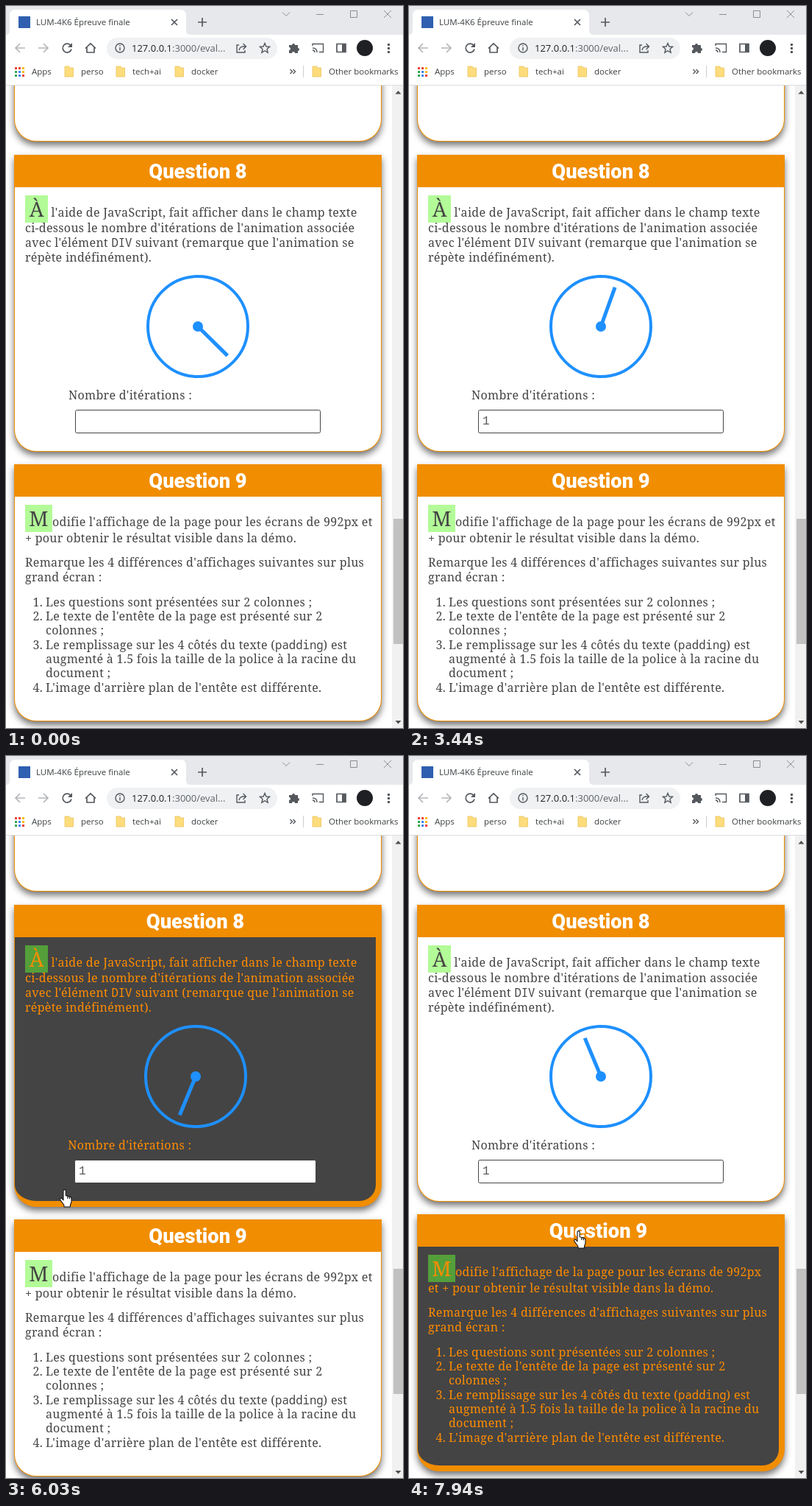
Animation, 540 px wide and 980 px high, one loop 8 s. Source, as an HTML page:

```html
<!DOCTYPE html>
<html lang="fr">
<head>
<meta charset="utf-8">
<title>Épreuve finale</title>
<style>
  html, body { margin: 0; width: 100%; height: 100%; overflow: hidden; background: #fff; }
  svg { display: block; }
  .shell { fill: #f18d00; filter: drop-shadow(0 5px 5px rgba(0, 0, 0, .55)); }
  .title { font: 900 27.3px Roboto, sans-serif; fill: #fff; text-anchor: middle; }
  .body { font: 16px "Noto Serif", serif; letter-spacing: .3px; }
  .letter { font-size: 28px; letter-spacing: 0; text-anchor: middle; }
  .mono { font: 15.6px "Noto Sans Mono", monospace; letter-spacing: 0; }
  .number { text-anchor: end; }
  .field { font: 16px "Liberation Mono", monospace; fill: #555; }
  .dial { stroke: #1e90ff; fill: none; }
  .ui { font: 11.5px "Open Sans", sans-serif; fill: #3c4043; }
  .icon { fill: none; stroke: #55595e; stroke-width: 1.7; }
  .fine { stroke-width: 1.4; }
  .faint { stroke: #b4b6b9; }
  .thin { stroke: #8b8d90; stroke-width: 1; }
  .solid { fill: #55595e; stroke: none; }
</style>
</head>
<body>
<svg width="540" height="980" viewBox="0 0 540 980">
  <g id="page"></g>

  <g id="scrollbar">
    <rect x="525" y="107" width="15" height="873" fill="#f1f1f1"/>
    <rect x="527" y="696" width="13" height="170" fill="#c1c1c1"/>
    <path d="M529.5 119.5h8l-4-4.5zM529.5 970h8l-4 4.5z" fill="#505050"/>
  </g>

  <g id="browser" class="ui">
    <rect width="540" height="40" fill="#e7e8eb"/>
    <rect y="39" width="540" height="69" fill="#fff"/>
    <rect y="107" width="540" height="1" fill="#dcdde0"/>
    <path d="M0 39q5 0 5-6V13q0-8 8-8H237q8 0 8 8V33q0 6 6 6z" fill="#fff"/>
    <rect x="17" y="14" width="16" height="16" fill="#2f5fb0"/>
    <text x="41" y="26">LUM-4K6 Épreuve finale</text>
    <path class="icon" d="M225 18l8 8m0-8l-8 8M261 22h12m-6-6v12"/>
    <path class="icon thin" d="M376 8.5l5 5 5-5M422 11.5h10M468.5 6.5h9v9h-9zM514 6l10 10m0-10l-10 10"/>

    <path class="icon faint" d="M26 57H13m6-6l-6 6 6 6M44 57h13m-6-6l6 6-6 6"/>
    <path class="icon" d="M88 53.5a6 6 0 1 0 1 5M108 57.5l7-6.500 7 6.500M110 56v7h10v-7"/>
    <path class="solid" d="M90 50v6h-6z"/>
    <rect x="137" y="43" width="232" height="29" rx="14.5" fill="#eff1f3"/>
    <circle class="icon fine" cx="155" cy="57" r="6"/>
    <path class="icon fine" d="M155 56v4.5M155 53v1.5M317 53h-3v10h11v-3M317 60q1-5 6-5h3m-3.5-4l4 4-4 4"/>
    <text x="171" y="62" font-size="13" fill="#202124">127.0.0.1<tspan fill="#5f6368">:3000/eval...</tspan></text>
    <path class="icon fine" d="M352 50.5l1.9 4.5 4.7.4-3.6 3.1 1.1 4.7-4.1-2.5-4.1 2.5 1.1-4.7-3.6-3.1 4.7-.4z"/>
    <path class="solid" d="M385 53h4a2 2 0 1 1 4 0h4v4a2 2 0 1 1 0 4v3h-4a2 2 0 1 0-4 0h-4v-4a2 2 0 1 0 0-4z"/>
    <path class="icon fine" d="M417 54v-2.5h14.5v11H426M417 57q6 0 6 6M417 60q3 0 3 3"/>
    <path class="icon" d="M450 51.5h12v11h-12z"/>
    <path class="solid" d="M457 51h5v12h-5z"/>
    <circle cx="488" cy="57" r="11" fill="#1f2023"/>
    <path class="solid" d="M519 51h3v3h-3zM519 56h3v3h-3zM519 61h3v3h-3z"/>

    <g id="apps"></g>
    <text x="35" y="93">Apps</text>
    <text x="102" y="93">perso</text>
    <text x="172" y="93">tech+ai</text>
    <text x="252" y="93">docker</text>
    <text x="439" y="93">Other bookmarks</text>
    <path class="icon fine" d="M386.5 86l3 3-3 3m4-6l3 3-3 3"/>
    <rect x="404" y="81" width="1" height="16" fill="#cdcfd2"/>
  </g>

  <g id="cursor">
    <path fill="#fff" stroke="#111" stroke-width="1.1" stroke-linejoin="round"
      d="M5 2.2a1.6 1.6 0 0 1 3.2 0V8.8l5.4 1.2a3 3 0 0 1 2.4 3v3.6c0 2.2-1.6 3.6-1.6 6V24H6v-1.8C6 20.5 2.8 18 .8 14.2 0 12.6 2 11.4 3.2 12.8L5 14.8ZM10.8 9.5v3.5M13.4 10v3.2"/>
  </g>
</svg>

<script>
const LOOP = 8000, STEP = 67.9;
const RADIUS = 30, LEFT = 11, RIGHT = 511;
const $ = selector => document.querySelector(selector);
const set = (element, attributes) => {
  for (const name in attributes) element.setAttribute(name, attributes[name]);
};

const line = (x, y, text, attributes = '') => `<text x="${x}" y="${y}" ${attributes}>${text}</text>`;
const item = (y, number, text) => line(50, y, number + '.', 'class="number"') + line(54, y, text);

// Card contents use coordinates relative to the top of their card.
const card = (id, title, letter, capWidth, content) => `
  <g id="${id}">
    <path class="shell"/><path class="inner"/>
    <text class="title" y="32">${title}</text>
    <g class="body">
      <rect class="cap" x="26" y="55" width="${capWidth}" height="37"/>
      ${line(26 + capWidth / 2, 83.5, letter, 'class="letter"')}
      ${content}
    </g>
  </g>`;

$('#page').innerHTML =
  card('previous', '', '', 0, '') +
  card('q8', 'Question 8', 'À', 31,
    line(61.5, 83.5, "l'aide de JavaScript, fait afficher dans le champ texte") +
    line(26, 105, "ci-dessous le nombre d'itérations de l'animation associée") +
    line(26, 124.5, `avec l'élément <tspan class="mono">DIV</tspan> suivant (remarque que l'animation se`) +
    line(26, 145, 'répète indéfinément).') +
    `<g id="dial" class="dial">
      <circle r="68" stroke-width="4"/>
      <circle r="7" fill="#1e90ff" stroke="none"/>
      <path id="hand" d="M0 0V-56.5" stroke-width="5"/>
    </g>` +
    line(85, 332, "Nombre d'itérations :", 'id="label"') +
    '<rect id="input" y="346.5" height="31" rx="2" fill="#fff" stroke="#444"/>' +
    line(100, 366, '', 'id="count" class="field"')) +
  card('q9', 'Question 9', 'M', 37,
    line(63, 83.5, '', 'id="wrapA"') +
    line(26, 106, '', 'id="wrapB"') +
    line(26, 139, "Remarque les 4 différences d'affichages suivantes sur plus") +
    line(26, 158.5, 'grand écran :') +
    item(192.5, 1, 'Les questions sont présentées sur 2 colonnes ;') +
    item(211.5, 2, "Le texte de l'entête de la page est présenté sur 2") +
    line(54, 231, 'colonnes ;') +
    item(250.5, 3, 'Le remplissage sur les 4 côtés du texte (<tspan class="mono">padding</tspan>) est') +
    line(54, 270, 'augmenté à 1.5 fois la taille de la police à la racine du') +
    line(54, 289, 'document ;') +
    item(308.5, 4, "L'image d'arrière plan de l'entête est différente."));

const appColors = ['#ea4335', '#ea4335', '#fbbc04', '#34a853', '#4285f4', '#fbbc04', '#34a853', '#4285f4', '#ea4335'];
$('#apps').innerHTML =
  appColors.map((color, i) =>
    `<rect x="${12 + i % 3 * 5}" y="${83 + Math.floor(i / 3) * 5}" width="3" height="3" fill="${color}"/>`).join('') +
  [80, 150, 230, 417].map(x =>
    `<path d="M${x} 82h6l1 2h4.500v12H${x}z" fill="#fddc7c" stroke="#e9c35c" stroke-width=".8"/>`).join('');

// CSS "ease" timing curve, solved by bisection.
function ease(x) {
  if (x <= 0) return 0;
  if (x >= 1) return 1;
  let low = 0, high = 1, s;
  for (let i = 0; i < 20; i++) {
    s = (low + high) / 2;
    if (.75 * s * (1 - s) + s ** 3 < x) low = s; else high = s;
  }
  return .3 * s * (1 - s) ** 2 + 3 * s * s * (1 - s) + s ** 3;
}

const mix = (from, to, p) => `rgb(${from.map((v, i) => Math.round(v + (to[i] - v) * p))})`;
const WHITE = [255, 255, 255], DARK = [68, 68, 68], ORANGE = [255, 140, 0];
const LIME = [179, 251, 152], GREEN = [84, 159, 58];

const borderAt = hover => Math.floor(1 + 7 * hover);

function drawCard(id, top, height, hover) {
  const border = borderAt(hover), r = RADIUS - border;
  const part = name => $(`#${id} ${name}`);
  set($('#' + id), { transform: `translate(0 ${top})` });
  set(part('.shell'), {
    d: `M${LEFT} 0H${RIGHT}V${height - RADIUS}a${RADIUS} ${RADIUS} 0 0 1 ${-RADIUS} ${RADIUS}` +
       `H${LEFT + RADIUS}a${RADIUS} ${RADIUS} 0 0 1 ${-RADIUS} ${-RADIUS}z`
  });
  set(part('.inner'), {
    d: `M${LEFT + 1} 44H${RIGHT - border}V${height - RADIUS}a${r} ${r} 0 0 1 ${-r} ${r}` +
       `H${LEFT + RADIUS}a${RADIUS - 1} ${r} 0 0 1 ${1 - RADIUS} ${-r}z`,
    fill: mix(WHITE, DARK, hover)
  });
  set(part('.title'), { x: 261 - (border - 1) / 2 });
  set(part('.body'), { fill: mix(DARK, ORANGE, hover) });
  set(part('.cap'), { fill: mix(LIME, GREEN, hover) });
}

const cursorPath = [
  [3900, 545, 470], [4400, 180, 555], [4880, 111, 574], [5400, 92, 585], [5900, 81, 586],
  [6400, 77, 594], [6750, 105, 572], [7140, 144, 535], [7250, 152, 545], [7340, 190, 596], [7450, 231, 644]
];

function drawCursor(t) {
  const next = cursorPath.findIndex(key => key[0] > t);
  const b = cursorPath[next < 0 ? cursorPath.length - 1 : next];
  const a = cursorPath[next - 1] || b;
  const k = a === b ? 0 : (t - a[0]) / (b[0] - a[0]);
  const at = i => a[i] + (b[i] - a[i]) * k;
  set($('#cursor'), {
    transform: `translate(${Math.round(at(1) - 7)} ${Math.round(at(2))})`,
    visibility: t < cursorPath[0][0] ? 'hidden' : 'visible'
  });
}

function draw(time) {
  const step = Math.floor((time % LOOP + 30) / STEP), t = step * STEP;
  const hover8 = ease((t - 4000) / 500) - ease((t - 7365) / 500);
  const hover9 = ease((t - 7400) / 500);
  const grow = borderAt(hover8) - 1;

  drawCard('previous', -100, 284, 0);
  drawCard('q8', 202, 403 + grow, hover8);
  drawCard('q9', 622 + grow, 349, hover9);

  const angle = 134.5 + 4.81 * step;
  set($('#dial'), { transform: `translate(${Math.round(261 - grow / 2)} 233)` });
  set($('#hand'), { transform: `rotate(${angle})` });
  set($('#label'), { x: 85 - grow * .1 });

  // The field stays centred and shrinks a little, snapped to whole pixels.
  const fieldLeft = Math.floor(94 - grow * .14), fieldRight = Math.ceil(428 - grow * .86);
  set($('#input'), { x: fieldLeft + .5, width: fieldRight - fieldLeft - 1 });
  set($('#count'), { x: fieldLeft + 6 });
  $('#count').textContent = Math.floor(angle / 360) || '';

  const narrow = borderAt(hover9) > 2;
  $('#wrapA').textContent = "odifie l'affichage de la page pour les écrans de 992px" + (narrow ? '' : ' et');
  $('#wrapB').textContent = (narrow ? 'et ' : '') + '+ pour obtenir le résultat visible dans la démo.';
  drawCursor(t);
}

const start = performance.now();
function tick() {
  draw(performance.now() - start);
  requestAnimationFrame(tick);
}
tick();
</script>
</body>
</html>
```
